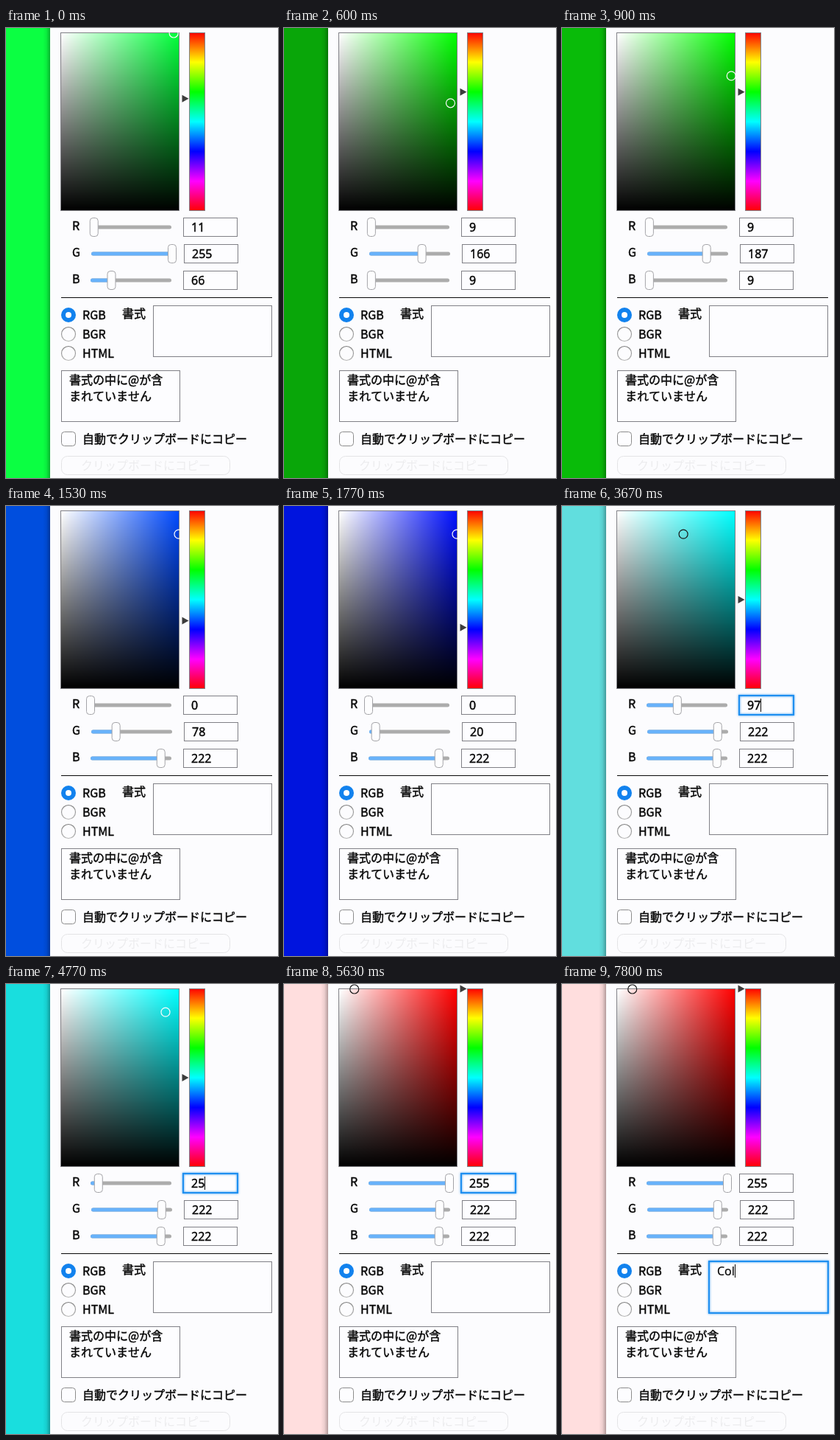
Animation of 370x610 px, one loop 8 s. Source, as an HTML page with a canvas:

```html
<!DOCTYPE html>
<html lang="ja">
<head>
<meta charset="utf-8">
<title>Color picker</title>
<style>
  html, body { margin: 0; width: 100%; height: 100%; overflow: hidden; background: #fcfcfe; }
  canvas { display: block; }
</style>
</head>
<body>
<canvas id="stage" width="370" height="610"></canvas>
<script>
const LOOP = 8000, LAG = 30;
const PAD = { x: 75, y: 7, w: 161, h: 241 };
const INK = '#080808', BORDER = '#808086', BLUE = '#1f8ff0';
const LABEL = '500 16px "Noto Sans CJK JP", "Noto Sans CJK", sans-serif';
const VALUE = '500 16px "Noto Sans", "Noto Sans CJK JP", sans-serif';

// Keys: [time, value], linear in between
const HUE = [[0, 133.5], [320, 120], [1120, 120], [1500, 218.9], [1530, 222.6],
             [1800, 238], [2480, 180]];
const SAT = [[0, .957], [700, .945], [870, .952], [900, .97], [1020, 1]];
const VAL = [[0, 1], [330, 1], [640, .55], [870, .7335], [900, .759], [1060, .8706]];
const RED = [[2700, 0], [3320, 97]];

// Keyboard and mouse events in the two editable fields
const RED_START = 2700, RED_FOCUS = 3400, RED_SELECT = 4070;
const RED_KEYS = [4330, 4700, 5100];
const FORMAT_FOCUS = 6020, CARET_OFF = 6800;
const FORMAT_KEYS = [7300, 7600, 7800];
const BLINK = 500;

const ctx = document.getElementById('stage').getContext('2d');
const padImage = ctx.createImageData(PAD.w, PAD.h);

const clamp = (v, lo, hi) => Math.min(hi, Math.max(lo, v));
const css = c => `rgb(${c.map(Math.round).join(',')})`;
const typed = (str, keys, t) => str.slice(0, keys.filter(k => t >= k).length);

function track(keys, t) {
  if (t <= keys[0][0]) return keys[0][1];
  for (let i = 1; i < keys.length; i++) {
    const [t0, a] = keys[i - 1], [t1, b] = keys[i];
    if (t < t1) return a + (b - a) * (t - t0) / (t1 - t0);
  }
  return keys[keys.length - 1][1];
}

function toRgb({ h, s, v }) {
  return [5, 3, 1].map(n => {
    const k = (n + h / 60) % 6;
    return 255 * v * (1 - s * clamp(Math.min(k, 4 - k), 0, 1));
  });
}

function toHsv([r, g, b]) {
  const max = Math.max(r, g, b), d = max - Math.min(r, g, b);
  let h = 0;
  if (d) {
    if (max === r) h = (g - b) / d + 6;
    else if (max === g) h = (b - r) / d + 2;
    else h = (r - g) / d + 4;
  }
  return { h: h * 60 % 360, s: max ? d / max : 0, v: max / 255 };
}

const pick = t => ({ h: track(HUE, t), s: track(SAT, t), v: track(VAL, t) });

// Values trail slightly behind the dragged markers
function stateAt(t) {
  if (t < RED_START) {
    return { mark: pick(t), rgb: toRgb(pick(Math.max(0, t - LAG))).map(Math.round) };
  }
  const red = typed('255', RED_KEYS, t) || Math.round(track(RED, t));
  const rgb = [Number(red), 222, 222];
  return { mark: toHsv(rgb), rgb };
}

function text(str, x, y, font = LABEL, color = INK, weight = .45) {
  ctx.font = font;
  ctx.fillStyle = ctx.strokeStyle = color;
  ctx.lineWidth = weight;
  ctx.fillText(str, x, y);
  if (weight) ctx.strokeText(str, x, y);
  return x + ctx.measureText(str).width;
}

function roundBox(x, y, w, h, r, fill, stroke) {
  ctx.beginPath();
  ctx.roundRect(x, y, w, h, r);
  if (fill) { ctx.fillStyle = fill; ctx.fill(); }
  if (stroke) { ctx.strokeStyle = stroke; ctx.lineWidth = 1; ctx.stroke(); }
}

function field(x, y, w, h, focused) {
  ctx.fillStyle = '#fdfdff';
  ctx.fillRect(x, y, w, h);
  if (focused) {
    ctx.save();
    ctx.shadowColor = BLUE;
    ctx.shadowBlur = 3;
    ctx.strokeStyle = BLUE;
    ctx.lineWidth = 2;
    ctx.strokeRect(x, y, w, h);
    ctx.restore();
  } else {
    ctx.strokeStyle = BORDER;
    ctx.lineWidth = 1;
    ctx.strokeRect(x + .5, y + .5, w - 1, h - 1);
  }
}

function caret(x, y) {
  ctx.fillStyle = INK;
  ctx.fillRect(Math.round(x), y, 1, 18);
}

function drawBar(rgb) {
  ctx.fillStyle = css(rgb);
  ctx.fillRect(0, 0, 60, 610);
  const shade = ctx.createLinearGradient(50, 0, 60, 0);
  shade.addColorStop(0, 'rgba(0,0,0,0)');
  shade.addColorStop(.5, 'rgba(0,0,0,.07)');
  shade.addColorStop(1, 'rgba(0,0,0,.3)');
  ctx.fillStyle = shade;
  ctx.fillRect(50, 0, 10, 610);
}

function drawPad(hue) {
  const [r, g, b] = toRgb({ h: hue, s: 1, v: 1 });
  const px = padImage.data;
  for (let y = 0, i = 0; y < PAD.h; y++) {
    const v = 1 - y / (PAD.h - 1);
    for (let x = 0; x < PAD.w; x++, i += 4) {
      const s = x / (PAD.w - 1);
      px[i] = v * (255 - s * (255 - r));
      px[i + 1] = v * (255 - s * (255 - g));
      px[i + 2] = v * (255 - s * (255 - b));
      px[i + 3] = 255;
    }
  }
  ctx.putImageData(padImage, PAD.x, PAD.y);
  ctx.strokeStyle = BORDER;
  ctx.lineWidth = 1;
  ctx.strokeRect(74.5, 6.5, 161, 241);
}

function drawHueStrip(hue) {
  const grad = ctx.createLinearGradient(0, 6, 0, 248);
  for (let i = 0; i <= 6; i++) {
    grad.addColorStop(i / 6, css(toRgb({ h: i * 60 % 360, s: 1, v: 1 })));
  }
  ctx.fillStyle = grad;
  ctx.fillRect(249, 6, 22, 242);
  ctx.strokeStyle = BORDER;
  ctx.lineWidth = 1;
  ctx.strokeRect(249.5, 6.5, 21, 241);

  const y = 6.5 + 241 * hue / 360;
  ctx.beginPath();
  ctx.moveTo(239.5, y - 5);
  ctx.lineTo(248.5, y);
  ctx.lineTo(239.5, y + 5);
  ctx.fillStyle = '#3c3c3c';
  ctx.fill();
}

function drawRing({ s, v }, [r, g, b]) {
  const light = .299 * r + .587 * g + .114 * b > 170;
  ctx.beginPath();
  ctx.arc(PAD.x + 160 * s, 7 + 241 * (1 - v), 6, 0, 2 * Math.PI);
  ctx.strokeStyle = light ? '#181818' : '#fcfcfc';
  ctx.lineWidth = 1.2;
  ctx.stroke();
}

function drawChannel(i, value, t) {
  const y = 270 + 36 * i, dx = i === 1 ? 1 : 0;
  const x = 115 + dx, thumb = x + 110 * value / 255;
  const editing = i === 0 && t >= RED_FOCUS && t < FORMAT_FOCUS;
  const selected = editing && t >= RED_SELECT && t < RED_KEYS[0];

  text('RGB'[i], 90, y + 4);
  roundBox(x, y - 2.5, 110, 5, 2.5, '#acacac');
  roundBox(x, y - 2.5, thumb - x, 5, 2.5, '#68b2fa');
  roundBox(thumb - 5.5, y - 12.5, 11, 25, 4, '#fdfdfe', '#a4a4a8');

  field(241 + dx, y - 13, 74, 26, editing);
  if (selected) {
    ctx.font = VALUE;
    ctx.fillStyle = '#0078d7';
    ctx.fillRect(252, y - 9, ctx.measureText(value).width, 18);
  }
  const end = text(String(value), 252 + dx, y + 6, VALUE, selected ? '#fff' : INK);
  const blinkedOff = t >= RED_KEYS[2] + BLINK;
  if (editing && !selected && !blinkedOff) caret(end, y - 9);
}

function drawRadio(label, y, on) {
  ctx.beginPath();
  ctx.arc(85, y, on ? 10 : 9.5, 0, 2 * Math.PI);
  if (on) {
    ctx.fillStyle = '#1282ee';
    ctx.fill();
    ctx.beginPath();
    ctx.arc(85, y, 4, 0, 2 * Math.PI);
    ctx.fillStyle = '#fff';
    ctx.fill();
  } else {
    const rim = ctx.createLinearGradient(0, y - 10, 0, y + 10);
    rim.addColorStop(0, '#808080');
    rim.addColorStop(1, '#b8b8b8');
    ctx.strokeStyle = rim;
    ctx.lineWidth = 1.2;
    ctx.stroke();
  }
  text(label, 104, y + 6);
}

function drawForm(t) {
  ctx.fillStyle = INK;
  ctx.fillRect(75, 365, 287, 1);
  ['RGB', 'BGR', 'HTML'].forEach((name, i) => drawRadio(name, 389 + 26 * i, i === 0));

  const editing = t >= FORMAT_FOCUS;
  text('書式', 158, 393);
  field(200, 376, 162, 70, editing);
  const end = text(typed('Col', FORMAT_KEYS, t), 211, 395, VALUE, INK, .2);
  if (editing && (t < CARET_OFF || t >= FORMAT_KEYS[0])) caret(end, 380);

  field(75, 464, 162, 70, false);
  text('書式の中に@が含', 86, 483);
  text('まれていません', 86, 505);

  roundBox(75.5, 547.5, 19, 19, 4, '#fdfdff', '#8c8c8c');
  text('自動でクリップボードにコピー', 104, 563);

  roundBox(75.5, 580.5, 229, 25, 8, null, '#e4e4e6');
  text('クリップボードにコピー', 102, 599, LABEL, '#ececee', 0);
}

function draw(t) {
  const { mark, rgb } = stateAt(t);
  ctx.fillStyle = '#fcfcfe';
  ctx.fillRect(0, 0, 370, 610);
  drawBar(rgb);
  drawPad(mark.h);
  drawHueStrip(mark.h);
  drawRing(mark, rgb);
  rgb.forEach((v, i) => drawChannel(i, v, t));
  drawForm(t);
}

const start = performance.now();
function tick() {
  draw((performance.now() - start) % LOOP);
  requestAnimationFrame(tick);
}
tick();
</script>
</body>
</html>
```
